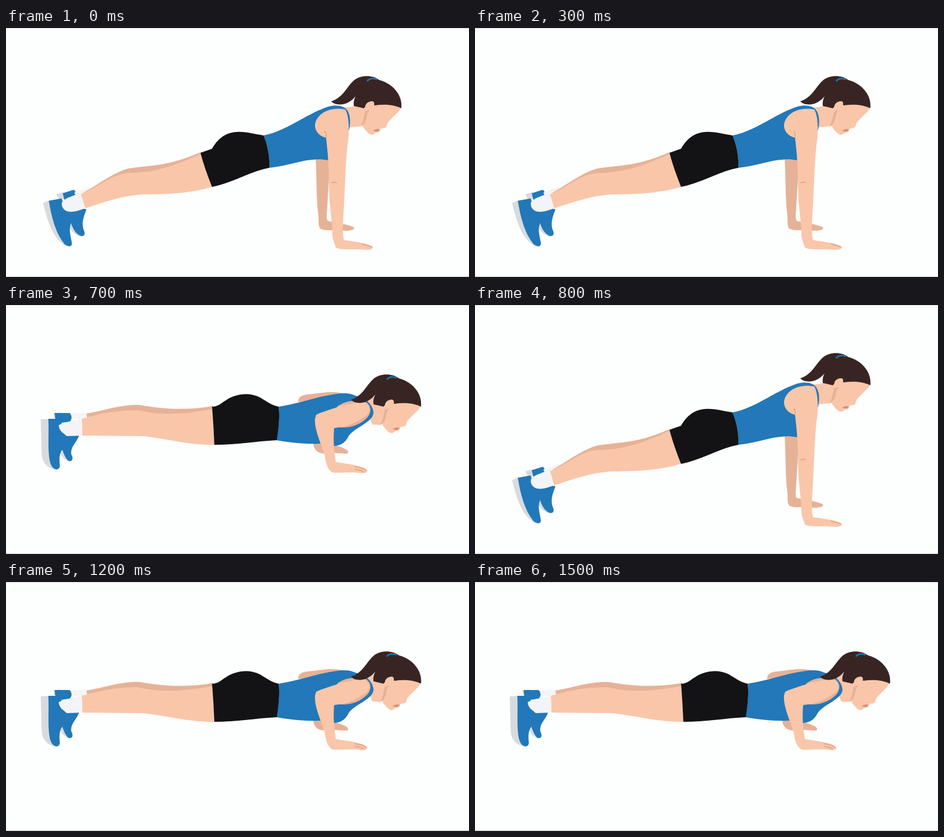
An HTML page for the animation above (1.6 s loop, 800x431 px).

```html
<!DOCTYPE html>
<html lang="en">
<head>
<meta charset="utf-8">
<title>Push-up</title>
<style>
  html, body { margin: 0; width: 100%; height: 100%; overflow: hidden; background: #fdfefe; }
  svg { display: block; width: 100vw; height: 100vh; }
  .skin { fill: #f9c6a9; }
  .shade { fill: #e6b297; }
  .blue { fill: #2278b8; }
  .black { fill: #131315; }
  .hair { fill: #382523; }
  .sole { fill: #d8dbde; }
  .sock { fill: #f3f4f7; }
  .line { fill: none; stroke: #dca083; stroke-width: 1.5; stroke-linecap: round; }
</style>
</head>
<body>
<svg viewBox="0 0 800 431">
  <defs>
    <g id="head">
      <path class="skin" d="M618 137L640 128L683 135C681 143 676 147 671 152C666 157 661 161 659 165L657 171C655 174 650 173 648 174L646 177C647 180 642 181 639 181C636 184 632 186 629 184C625 182 622 177 617 172Z"/>
      <path class="shade" d="M622 137L628 143C622 149 624 155 621 162C619 166 616 169 613 171L617 160Z"/>
      <path d="M634 178Q641 173 646 176Q643 181 634 178Z" fill="#d58c76"/>
      <path class="hair" d="M683 139C686 119 671 97 645 90C632 80 612 82 602 90C588 102 583 120 562 127C567 133 580 134 589 130C597 126 601 122 604 118C601 124 600 130 601 135C607 136 613 138 618 139L630 128L637 134C652 132 668 132 683 139Z"/>
      <path class="skin" d="M621 140C619 131 627 126 634 127C638 129 636 136 633 139C629 144 625 141 621 145Z"/>
      <path d="M624 92Q630 85 641 89" fill="none" stroke="#2278b8" stroke-width="2.5"/>
    </g>
  </defs>

  <path d="M0 .5H800" stroke="#dcdcdc"/>
  <path d="M0 430.5H800" stroke="#c8c8c8"/>

  <g id="up">
    <path class="sole" d="M87 288L99 284L103 295L92 298ZM108 342C112 352 121 360 132 361L118 334Z"/>
    <path class="blue" d="M98 286L117 280C122 283 122 290 116 293L101 298ZM112 336C115 348 122 358 130 360C137 361 137 354 134 349C130 336 135 325 139 314L116 315Z"/>
    <path class="sock" d="M118 285L144 275L146 283L122 293Z"/>
    <path class="sole" d="M64 303L75 298L114 376C110 381 103 378 96 372C78 357 71 330 64 303Z"/>
    <path class="blue" d="M74 299L96 295L104 315L138 313C134 321 118 326 112 339C108 349 112 361 114 373C113 380 106 378 101 374C86 355 79 330 74 299Z"/>
    <path class="shade" d="M132 286C160 271 185 250 212 243C250 237 280 240 336 215L342 240L200 270Z"/>
    <path class="skin" d="M129 288C160 276 180 254 210 251C260 250 290 239 338 217L356 275C320 286 280 288 235 288C203 290 170 301 137 312Z"/>
    <path class="sock" d="M97 301C105 292 118 291 128 285Q134 298 136 312C125 317 112 320 105 317C98 314 95 307 97 301Z"/>
    <path class="shade" d="M535 226H559C559 255 556 290 555 312C554 322 553 330 556 334C568 337 590 339 601 345C603 349 598 350 590 351L568 350C558 350 547 351 542 346C539 340 541 330 539 318C536 290 537 255 535 226Z"/>
    <path class="skin" d="M560 138C580 136 592 140 606 133L622 140L621 166C616 172 606 170 594 172L575 185Z"/>
    <path class="blue" d="M445 186C485 178 520 148 557 136C572 132 585 135 590 143C596 153 595 165 593 176L557 229C545 227 538 227 530 228C505 230 485 239 455 242C456 225 453 205 445 186Z"/>
    <path class="skin" d="M579 140C550 138 533 155 534 171C536 183 545 188 553 190C556 215 558 240 558 268C558 302 563 330 564 352C563 366 568 372 570 380C578 385 600 382 624 384C631 384 636 381 633 378C620 371 600 370 584 367C580 355 583 330 584 305C586 270 587 230 590 202C594 182 593 150 586 141Z"/>
    <path class="line" d="M553 189Q554 183 551 179M563 268Q567 266 571 268M615 374Q625 376 632 379"/>
    <path class="black" d="M336 216L356 209C365 193 378 181 398 180C416 179 430 184 445 186C453 205 456 225 455 242C422 248 392 268 356 275C348 255 341 235 336 216Z"/>
    <use href="#head"/>
  </g>

  <g id="down">
    <path class="sole" d="M82 187L95 186L97 204L84 198ZM94 256C97 264 103 270 111 271L106 244Z"/>
    <path class="blue" d="M84 187L110 187C114 191 115 197 110 202L95 204L85 196ZM97 250C101 260 104 268 109 270C116 271 116 264 113 259C110 246 123 237 126 226L104 226Z"/>
    <path class="sock" d="M112 188L141 186V197H114Z" fill-opacity=".9"/>
    <path class="sole" d="M60 198L74 197L92 283C87 287 80 284 73 280C59 270 62 255 61 235Z"/>
    <path class="blue" d="M73 197L93 197L104 226H126C121 238 104 241 97 251C90 261 93 272 93 280C90 287 83 285 79 279C70 264 75 220 73 197Z"/>
    <path class="shade" d="M139 188C175 181 200 172 230 173C270 180 310 183 357 175L360 200H141Z"/>
    <path class="skin" d="M131 197C165 187 195 182 228 182C255 189 295 192 357 180L360 242C310 242 280 231 235 227L132 226Z"/>
    <path class="sock" d="M91 208C100 203 118 200 131 197L132 226L105 227C99 221 92 219 91 208Z"/>
    <path class="shade" d="M505 168C504 160 511 156 520 155C545 153 560 148 582 153L560 162ZM531 240C532 250 538 256 548 257C562 254 578 258 590 257C594 253 587 249 579 246L560 240Z"/>
    <path class="skin" d="M603 158L636 160L660 176L652 205C647 209 641 207 633 207L622 180Z"/>
    <path class="blue" d="M471 176C510 170 540 157 578 153C587 152 597 153 604 157C622 161 634 172 635 186C635 203 603 211 592 227C586 239 577 244 566 244C560 240 550 240 540 240C515 241 490 238 467 234C470 218 474 195 471 176Z"/>
    <path class="shade" d="M572 176C585 165 608 163 622 168C631 174 632 185 625 194C613 207 596 213 578 212Z"/>
    <path class="skin" d="M536 190C548 184 565 180 580 174C596 171 612 167 622 170C630 176 630 184 624 190C612 200 597 207 582 211L567 213C565 235 567 253 570 272C590 275 610 277 622 284C627 288 624 291 615 291C598 288 580 291 565 290C556 286 553 276 551 262C545 240 532 216 534 196Z"/>
    <path class="line" d="M603 280Q615 281 622 286M603 285Q612 285 618 289"/>
    <path class="black" d="M356 176C368 176 372 169 380 165C395 154 420 150 439 160C452 168 460 174 471 176C474 195 470 218 468 234C430 236 400 242 360 242C359 220 358 200 356 176Z"/>
    <use href="#head" x="34" y="37"/>
  </g>
</svg>
<script>
  const HOLD = 400;
  const up = document.getElementById('up');
  const down = document.getElementById('down');

  function draw() {
    const lowered = Math.floor(performance.now() / HOLD) % 2 === 1;
    up.style.display = lowered ? 'none' : '';
    down.style.display = lowered ? '' : 'none';
    requestAnimationFrame(draw);
  }
  draw();
</script>
</body>
</html>
```
